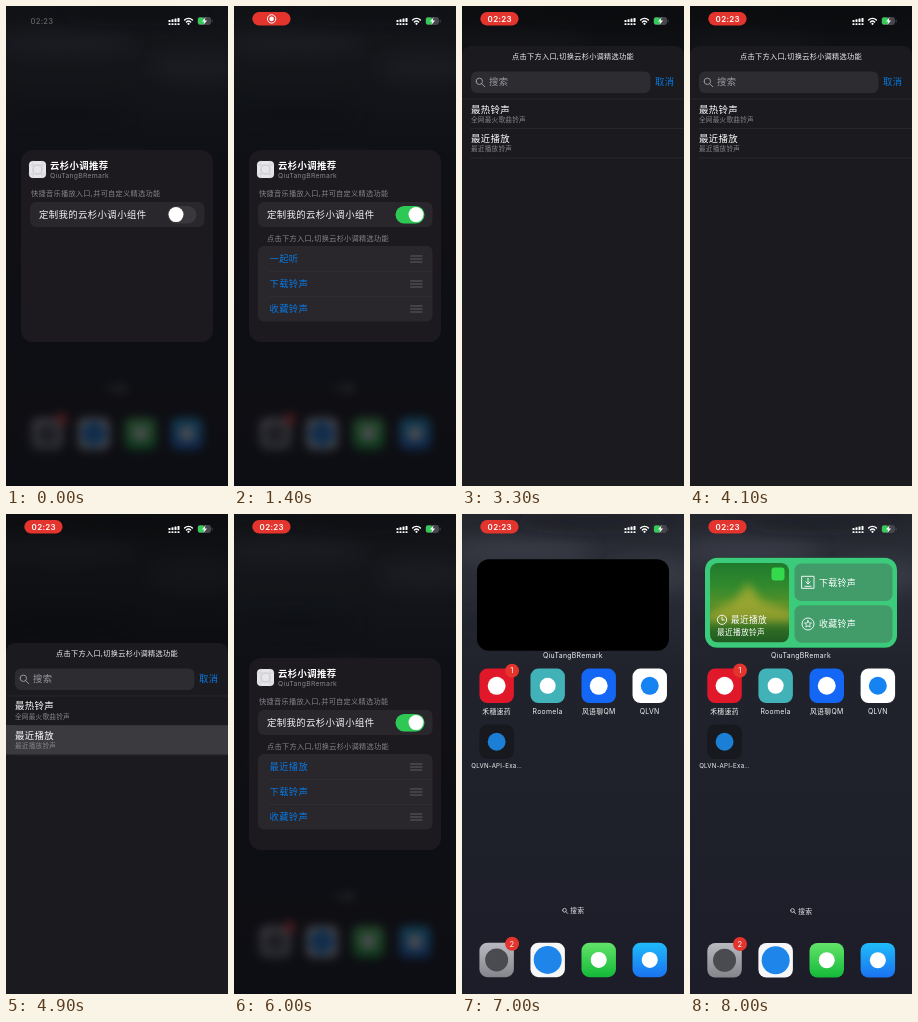
These frames come from a looping animation (222 by 480 pixels, 8100 ms). An HTML page:

```html
<!DOCTYPE html>
<html lang="zh">
<head>
<meta charset="utf-8">
<style>
html, body { margin: 0; width: 100%; height: 100%; overflow: hidden; background: #0d0e12; }
svg { display: block; width: 100vw; height: 100vh; }
text { font-family: Inter, "Noto Sans CJK SC", "Noto Sans CJK", sans-serif; letter-spacing: .04em; }
</style>
</head>
<body>
<svg id="stage" viewBox="0 0 222 480" preserveAspectRatio="none"></svg>
<script>
const LOOP = 8100;
const APP = '云杉小调', WIDGET = 'QiuTangBRemark';
const BLUE = '#0a78e0', GREY = '#85858a', RED = '#e3342d';

// Shape helpers; text y is the visual middle of the line, size is the pitch of a full-width character
const rect = (x, y, w, h, r, fill, more = '') =>
  `<rect x="${x}" y="${y}" width="${w}" height="${h}" rx="${r}" fill="${fill}" ${more}/>`;
const circle = (x, y, r, fill, more = '') =>
  `<circle cx="${x}" cy="${y}" r="${r}" fill="${fill}" ${more}/>`;
const line = (d, color, w = 1) =>
  `<path d="${d}" fill="none" stroke="${color}" stroke-width="${w}" stroke-linecap="round" stroke-linejoin="round"/>`;
const text = (x, y, size, s, fill = '#fff', more = '') =>
  `<text x="${x}" y="${y + size * .36}" font-size="${size * .96}" fill="${fill}" ${more}>${s}</text>`;
const mid = 'text-anchor="middle"';
const group = (id, body, more = '') => `<g id="${id}" ${more}>${body}</g>`;
const lens = (x, y, r, color, w) =>
  line(`M${x - r} ${y}a${r} ${r} 0 1 1 ${2 * r} 0a${r} ${r} 0 1 1 ${-2 * r} 0M${x + r * .7} ${y + r * .7}l${r} ${r}`, color, w);
const gradient = (id, ...stops) =>
  `<linearGradient id="${id}" x2="0" y2="1">${stops.map(([o, c]) =>
    `<stop offset="${o}" stop-color="${c}"/>`).join('')}</linearGradient>`;

const defs = `<defs>
  ${gradient('sky', [0, '#24262e'], [.1, '#2c2f38'], [.2, '#272a34'], [.32, '#20222c'], [1, '#1c1d28'])}
  ${gradient('photo', [0, '#1f7a2d'], [.3, '#338a2d'], [.5, '#55902a'], [.68, '#3f7d26'], [1, '#1f5a22'])}
  ${gradient('blueTile', [0, '#1fbcfb'], [1, '#1a72f0'])}
  ${gradient('greenTile', [0, '#62e468'], [1, '#14b93a'])}
  ${gradient('greyTile', [0, '#b9bac0'], [1, '#85868c'])}
  <filter id="soft" x="-50%" y="-100%" width="200%" height="300%"><feGaussianBlur stdDeviation="9"/></filter>
  <filter id="glow" x="-50%" y="-50%" width="200%" height="200%"><feGaussianBlur stdDeviation="4"/></filter>
  <clipPath id="photoClip">${rect(20, 49, 79, 79.5, 8, '#000')}</clipPath>
</defs>`;

const cloud = (x, y, rx, ry, fill, o) =>
  `<ellipse cx="${x}" cy="${y}" rx="${rx}" ry="${ry}" fill="${fill}" opacity="${o}" filter="url(#soft)"/>`;
const wall = rect(0, 0, 222, 480, 0, 'url(#sky)') +
  cloud(60, 36, 70, 11, '#484c58', .5) + cloud(190, 62, 45, 16, '#444854', .45) +
  cloud(130, 8, 80, 7, '#15161b', .5) + cloud(60, 108, 70, 12, '#181a21', .4);

const tile = (x, y, fill, dot, r = 10) =>
  rect(x, y, 34.5, 34.5, 8, fill) + circle(x + 17.25, y + 17.25, r, dot);
const badge = (x, y, n) => circle(x, y, 7, RED) + text(x, y, 8, n, '#fff', mid);
const label = (x, y, s, size = 7.2) => text(x, y, size, s, '#f2f2f4', mid);
const cols = [17.3, 68.4, 119.5, 170.6];
const home = label(111, 141, WIDGET) +
  tile(cols[0], 154.5, '#e0182a', '#fff', 9) + tile(cols[1], 154.5, '#41b3b8', '#fff', 8) +
  tile(cols[2], 154.5, '#1466f5', '#fff', 9) + tile(cols[3], 154.5, '#fff', '#1583f2', 9) +
  tile(cols[0], 210.5, '#17191e', '#1c7fd6', 9) +
  ['禾穗速药', 'Roomela', '风语聊QM', 'QLVN'].map((s, i) => label(cols[i] + 17.2, 197, s)).join('') +
  label(34.5, 252, 'QLVN-API-Exa…', 6.4) + badge(50, 156.5, 1) +
  lens(102.5, 396.5, 1.9, '#d6d6da', .8) + text(108, 397, 7.2, '搜索', '#e4e4e8') +
  tile(cols[0], 429, 'url(#greyTile)', '#4a4b50', 11.5) +
  tile(cols[1], 429, '#f7f7f8', '#1e86ea', 14) +
  tile(cols[2], 429, 'url(#greenTile)', '#fff', 8) +
  tile(cols[3], 429, 'url(#blueTile)', '#fff', 8) + badge(50, 430, 2);

// Settings card
const handle = y => line([-3, 0, 3].map(d => `M176.5 ${y + d}h11.5`).join(''), '#5c5c61', 1);
const rows = ['', '下载铃声', '收藏铃声'].map((s, i) => {
  const y = 253 + 25 * i;
  return text(35.5, y, 9.7, s, BLUE, i ? '' : 'id="pick"') + handle(y) +
    (i ? line(`M35.5 ${y - 12.5}H198`, '#353338', .5) : '');
}).join('');
const card = rect(15, 144, 192, 192, 12, '#1c1a1f') +
  rect(23, 155, 17, 17, 4, '#e6e6ea') +
  line('M27 155v17M36 155v17M23 159h17M23 168h17', '#c2c2c8', .5) +
  circle(31.5, 163.5, 4.5, 'none', 'stroke="#b4b4ba" stroke-width=".5"') +
  text(44, 159.5, 9.8, APP + '推荐', '#fff', 'font-weight="600"') +
  text(44, 169.5, 7.1, WIDGET, GREY) +
  text(25, 187, 7.5, '快捷音乐播放入口,并可自定义精选功能', GREY) +
  rect(24, 196, 174.5, 25, 6, '#29272c') +
  text(33, 208.8, 9.8, `定制我的${APP}小组件`, '#f4f4f6') +
  rect(161.5, 200, 29, 17.5, 8.75, '#3a383d') +
  rect(161.5, 200, 29, 17.5, 8.75, '#2dc954', 'id="on"') +
  circle(0, 208.6, 7.5, '#fff', 'id="knob"') +
  group('list', text(33, 232, 7.5, `点击下方入口,切换${APP}精选功能`, GREY) +
    rect(24, 240, 174.5, 75.5, 6, '#29272c') + rows);

// Finished widget
const button = (y, s, icon) => rect(104.5, y, 98, 37.5, 7, '#419c6a') +
  icon + text(129, y + 18.7, 9.3, s);
const widget = rect(15, 43.7, 192, 90, 12, '#3cca7b') +
  `<g clip-path="url(#photoClip)">${rect(20, 49, 79, 79.5, 0, 'url(#photo)')}
    <path d="M15 100L45 86L58 68L72 88L104 96V108H15Z" fill="#c4b436" opacity=".6" filter="url(#glow)"/></g>` +
  rect(81.5, 53.5, 13, 13, 3, '#35d94c') +
  circle(32, 105.8, 4.6, 'none', 'stroke="#fff" stroke-width=".9"') + line('M32 103.1v2.9h2.3', '#fff', .9) +
  text(41, 105.8, 9, '最近播放') + text(27, 118, 8, '最近播放铃声') +
  button(49.5, '下载铃声', line('M112 62.3h12v12h-12zM118 64.3v5.5m-2.2-2l2.2 2.2l2.2-2.2M115 72.3h6', '#fff', .9)) +
  button(91.3, '收藏铃声', circle(118, 110, 6, 'none', 'stroke="#fff" stroke-width=".9"') +
    line('M118 106.6l1 2.3l2.5.2l-1.9 1.6l.6 2.4l-2.2-1.3l-2.2 1.3l.6-2.4l-1.9-1.6l2.5-.2z', '#fff', .8));

// Picker sheet
const option = (y, s, sub) => text(9, y, 9.8, s) + text(9, y + 10.3, 6.9, sub, GREY);
const sheet = rect(0, 40, 222, 520, 9, '#1b1a1f') +
  text(111, 50, 7.5, `点击下方入口,切换${APP}精选功能`, '#f0f0f2', mid) +
  rect(9, 65.5, 179.5, 21.5, 6, '#2d2c31') + lens(17.3, 75.3, 3.2, '#97979d', 1) +
  text(27, 76, 9.7, '搜索', '#97979d') + text(193, 76, 9.7, '取消', BLUE) +
  rect(0, 122, 222, 29.5, 0, '#3b3a3f', 'id="press"') +
  line('M0 93H222M9 122.5H222M9 152H222', '#302f34', .6) +
  option(103, '最热铃声', '全网最火歌曲铃声') + option(132.5, '最近播放', '最近播放铃声');

// Status bar
const status = group('clock', text(36, 15, 7.9, '02:23', '#fff', mid + ' font-weight="500"')) +
  group('pill', rect(18.3, 6, 38.3, 13.6, 6.8, RED) +
    group('rec', circle(37.6, 12.9, 4.2, 'none', 'stroke="#fff" stroke-width="1"') + circle(37.6, 12.9, 2.3, '#fff')) +
    group('time', text(37.8, 13, 8.3, '02:23', '#fff', mid + ' font-weight="600"'))) +
  [0, 1, 2, 3].map(i => rect(162.5 + 3 * i, 14 - .7 * i, 2, 2 + .7 * i, .5, '#fff') +
    rect(162.5 + 3 * i, 17.2, 2, 1.8, .5, '#fff')).join('') +
  line('M178.6 14a5.4 5.4 0 0 1 7.8 0M180.4 16a3 3 0 0 1 4.2 0', '#fff', 1.4) + circle(182.5, 17.8, 1.1, '#fff') +
  rect(191.5, 11, 13.5, 8, 2.4, '#45464b') + rect(192, 11.4, 6, 7.2, 1.8, '#35cb58') +
  rect(205.6, 13.6, 1, 2.8, .5, '#45464b') +
  '<path d="M199.6 11.2l-3.6 4.4h2.3l-1 3.4l3.8-4.6h-2.4z" fill="#fff"/>';

const stage = document.getElementById('stage');
stage.innerHTML = defs + wall + rect(0, 0, 222, 480, 0, '#000', 'id="dim"') +
  group('home', home) + group('card', card) +
  rect(15, 0, 192, 0, 12, '#000', 'id="back"') + group('widget', widget) +
  group('sheet', sheet) + status;

const el = {};
stage.querySelectorAll('g[id], rect[id], circle[id], text[id]').forEach(n => el[n.id] = n);

const ramp = (t, a, b) => Math.min(1, Math.max(0, (t - a) / (b - a)));
const easeOut = u => 1 - (1 - u) ** 3;
const easeInOut = u => u < .5 ? 2 * u * u : 1 - 2 * (1 - u) ** 2;
const mix = (a, b, u) => a + (b - a) * u;
const fade = (n, o) => n.setAttribute('opacity', o);

function draw(t) {
  // Recording pill
  const pill = ramp(t, 150, 450), named = ramp(t, 2200, 2450);
  fade(el.clock, .34 * (1 - ramp(t, 50, 250)));
  fade(el.pill, pill);
  fade(el.rec, 1 - named);
  fade(el.time, named);

  // Switch and list
  const on = easeInOut(ramp(t, 600, 850));
  fade(el.on, on);
  el.knob.setAttribute('cx', mix(170, 182, on));
  fade(el.list, ramp(t, 700, 950));
  el.pick.textContent = t < 5000 ? '一起听' : '最近播放';

  // Sheet up and down
  const up = easeOut(ramp(t, 2800, 3250)) - easeInOut(ramp(t, 4715, 5300));
  el.sheet.setAttribute('transform', `translate(0 ${440 * (1 - up)})`);
  fade(el.press, t < 4600 ? 0 : 1);

  // Card flips into the widget while the home screen comes back
  const p = easeOut(ramp(t, 6400, 7200)), k = 1 - p;
  const turn = Math.cos(Math.PI * Math.min(1, 1.3 * p));
  const cy = mix(240, 88.7, p), h = mix(192, 90, p);
  el.card.setAttribute('transform',
    `translate(0 ${cy}) scale(1 ${Math.max(0, turn) * h / 192}) translate(0 -240)`);
  const bh = Math.max(0, -turn) * h;
  el.back.setAttribute('y', cy - bh / 2);
  el.back.setAttribute('height', bh);
  fade(el.widget, ramp(t, 7350, 7600));

  fade(el.dim, .53 * k + .12 * up);
  el.home.setAttribute('transform', `translate(111 240) scale(${1 - .09 * k}) translate(-111 -240)`);
  el.home.style.filter = k > .02 ? `blur(${5.2 * k}px) opacity(${1 - .74 * k})` : 'none';
}

function tick(now) {
  draw(now % LOOP);
  requestAnimationFrame(tick);
}
draw(0);
requestAnimationFrame(tick);
</script>
</body>
</html>
```
